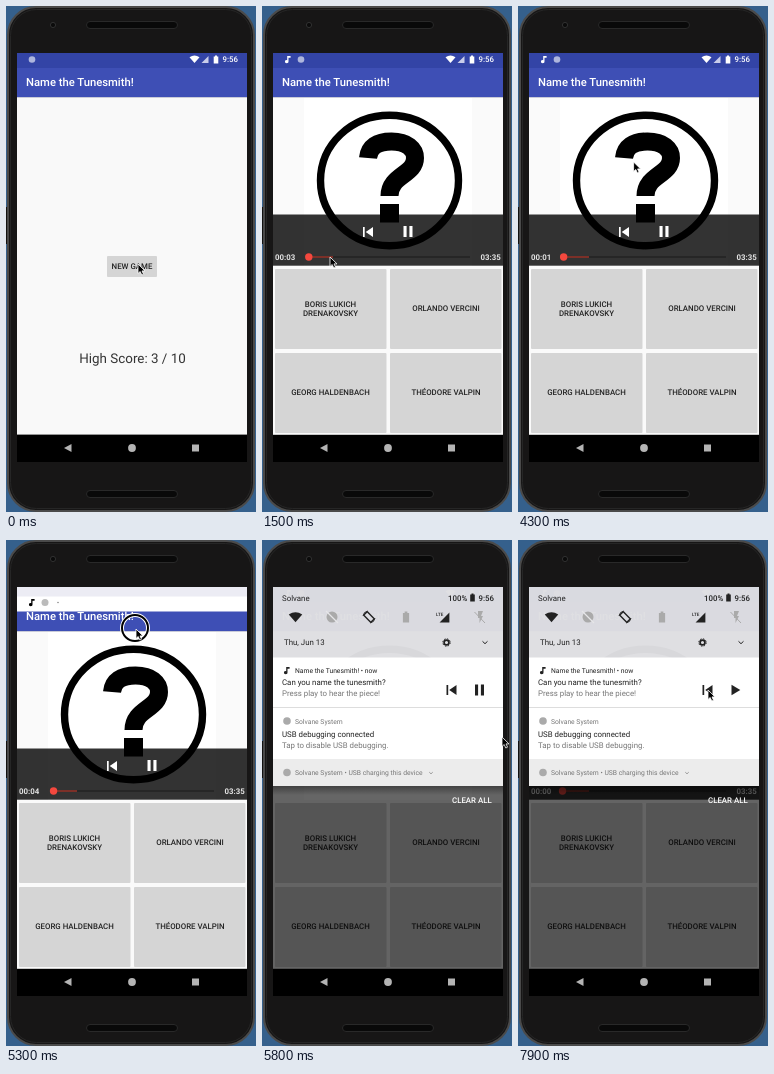
Write an HTML page that moves like this. It is 250x506 px and loops after 8 s.

```html
<!DOCTYPE html>
<html lang="en">
<head>
<meta charset="utf-8">
<title>Music quiz</title>
<style>
  html, body { margin: 0; width: 100%; height: 100%; overflow: hidden; background: #35608c; }
  svg { display: block; width: 250px; height: 506px; }
  text { font: 7.87px Roboto, sans-serif; white-space: pre; text-rendering: geometricPrecision; }
  .m { font-weight: 500; }
  .mid { text-anchor: middle; }
  .title { font-size: 11.25px; font-weight: 500; fill: #fff; }
  .small { font-size: 6.75px; }
  .grey { fill: #777; }
  .time { font-weight: 700; fill: #e4e4e4; }
  .line { fill: none; stroke: currentColor; }
</style>
</head>
<body>
<svg viewBox="0 0 250 506">
  <defs>
    <path id="note" d="M-.8 -3.5H2.6V-1.8H.5V2A1.8 1.6 0 1 1 -.8 .7Z"/>
    <path id="prev" d="M-5 -5H-3.3V5H-5ZM5 -5V5L-2.3 0Z"/>
    <path id="pause" d="M-4.5 -5.5H-1.4V5.5H-4.5ZM1.4 -5.5H4.5V5.5H1.4Z"/>
    <path id="play" d="M-4 -5.3L4.8 0L-4 5.3Z"/>
    <path id="wifi" d="M0 3.6L-5 -2.2Q0 -5.6 5 -2.2Z"/>
    <path id="signal" d="M-3.5 3.5H3.5V-3.5Z"/>
    <path id="battery" d="M-2.3 -3H-1V-4H1V-3H2.3V4H-2.3Z"/>
    <path id="chevron" class="line" d="M-2.5 -1.2L0 1.2L2.5 -1.2"/>
    <g id="appBar">
      <rect x="11" y="62" width="231" height="29" fill="#3e4fb5"/>
      <rect x="11" y="91" width="231" height="1" fill="#c9cbd8"/>
      <text class="title" x="20" y="80">Name the Tunesmith!</text>
    </g>
    <clipPath id="screen"><rect x="11" y="47" width="230" height="409"/></clipPath>
    <clipPath id="shadeClip"><rect id="shadeBox" x="11" y="47" width="231" height="0"/></clipPath>
    <linearGradient id="drop" x2="0" y2="1">
      <stop stop-opacity=".35"/><stop offset="1" stop-opacity="0"/>
    </linearGradient>
  </defs>

  <!-- handset -->
  <rect width="250" height="506" fill="#35608c"/>
  <rect x="2" y="1" width="246" height="504" rx="28" fill="#171616" stroke="#4a4a4a" stroke-width="2"/>
  <rect x="4.500" y="3.500" width="241" height="499" rx="26" fill="#171616" stroke="#262626"/>
  <path d="M.5 201V238" stroke="#111"/>
  <circle cx="47" cy="19" r="2.6" fill="#0b0b0b" stroke="#303030"/>
  <g fill="#090909" stroke="#292929">
    <rect x="80.500" y="15.500" width="91" height="7" rx="3.500"/>
    <rect x="80.500" y="484.500" width="91" height="7" rx="3.500"/>
  </g>

  <g clip-path="url(#screen)">
    <rect x="11" y="47" width="231" height="409" fill="#f9f9f9"/>
    <rect x="11" y="428.600" width="231" height="28"/>
    <g fill="#b4b4b4">
      <path d="M58 442L65.500 438V446Z"/>
      <circle cx="126" cy="442" r="3.900"/>
      <rect x="186" y="438.500" width="7" height="7"/>
    </g>

    <g id="home">
      <use href="#appBar"/>
      <rect id="newGame" x="101" y="250" width="50" height="21" rx="1" fill="#d5d5d5"/>
      <text class="m mid" x="126" y="263.300" fill="#222">NEW GAME</text>
      <text class="mid" x="126.500" y="356.500" fill="#333" style="font-size:13.4px">High Score: 3 / 10</text>
    </g>

    <rect id="surface" x="42" y="92" width="168" height="168"/>
    <g id="game">
      <path d="M11 62H242V428.600H11Z" fill="#fafafa"/>
      <rect x="42" y="92" width="168" height="168" fill="#fff"/>
      <use href="#appBar"/>
      <ellipse cx="127.500" cy="174.500" rx="69" ry="65.300" fill="none" stroke="#000" stroke-width="7.400"/>
      <path d="M106 152C107 141 115 135.500 129.500 135.500C145 135.500 153 143 153 152C153 169 127.500 169 127.500 190" fill="none" stroke="#000" stroke-width="18"/>
      <rect x="118" y="198" width="19" height="18.500"/>
      <g id="player">
        <rect x="11" y="208.500" width="231" height="51.200" fill-opacity=".8"/>
        <g fill="#fff">
          <use href="#prev" x="106" y="226"/>
          <use href="#pause" x="146" y="225.500"/>
        </g>
        <text class="time" id="clock" x="13" y="254"></text>
        <text class="time" x="218.500" y="254">03:35</text>
        <rect x="44" y="250" width="164" height="2" fill="#262626"/>
        <rect id="buffer" x="44" y="250" height="2" fill="#7c3028"/>
        <rect id="played" x="44" y="250" height="2" fill="#f4483e"/>
        <circle id="thumb" cy="251" r="3.700" fill="#f4483e"/>
      </g>
      <g fill="#d5d5d5">
        <rect x="13" y="263" width="111.500" height="80" rx="1"/>
        <rect x="128" y="263" width="111.500" height="80" rx="1"/>
        <rect x="13" y="347" width="111.500" height="80" rx="1"/>
        <rect x="128" y="347" width="111.500" height="80" rx="1"/>
      </g>
      <g fill="#222">
        <text class="m mid" x="68.500" y="300.500">BORIS LUKICH</text>
        <text class="m mid" x="68.500" y="309.500">DRENAKOVSKY</text>
        <text class="m mid" x="184" y="305">ORLANDO VERCINI</text>
        <text class="m mid" x="68.500" y="389">GEORG HALDENBACH</text>
        <text class="m mid" x="184" y="389">THÉODORE VALPIN</text>
      </g>
    </g>

    <rect x="11" y="47" width="231" height="15" fill="#3344a6"/>
    <g fill="#fff">
      <use id="tune" href="#note" x="26" y="53.500"/>
      <circle id="badge" cy="53.500" r="3.300" fill="#aeb6dd"/>
      <use href="#wifi" x="188.500" y="53.500"/>
      <use href="#signal" x="199" y="53.500" fill="#c9cdea"/>
      <use href="#battery" x="210" y="53.500"/>
      <text class="m" x="216.500" y="56.300">9:56</text>
    </g>

    <rect id="scrim" x="11" y="47" width="231" height="382"/>

    <g id="peek">
      <rect x="11" y="47" width="231" height="10" fill="#ececf4"/>
      <rect x="11" y="56.500" width="231" height="15" fill="#fff"/>
      <use href="#note" x="26" y="62.500"/>
      <circle cx="39" cy="62.500" r="3.500" fill="#bbb"/>
      <circle cx="52" cy="62.500" r=".8" fill="#888"/>
    </g>

    <g id="shade" clip-path="url(#shadeClip)" fill="#222" color="#222">
      <rect x="11" y="47" width="231" height="71" fill="#e9e9ec" opacity=".93"/>
      <text x="20" y="61">Solvane</text>
      <text class="m" x="186" y="61">100%</text>
      <use href="#battery" x="210.500" y="57.500"/>
      <text class="m" x="216.500" y="61">9:56</text>
      <use href="#wifi" transform="translate(33.500 77.500) scale(1.350)"/>
      <g fill="#aaa" color="#aaa">
        <circle cx="70" cy="77" r="5.500"/>
        <path d="M64 71L76 83" stroke="#e6e6e8" stroke-width="1.200"/>
        <use href="#battery" transform="translate(144 77) scale(1.350)"/>
        <path d="M216 71H221L219 76H221L217.500 83V78H216Z"/>
        <path class="line" d="M212.500 72L223 83"/>
      </g>
      <rect x="-2.500" y="-5" width="5" height="10" rx=".5" class="line" stroke-width="1.400" transform="translate(107 77) rotate(-45)"/>
      <path class="line" d="M101 76A6 6 0 0 1 106 71M113 78A6 6 0 0 1 108 83"/>
      <use href="#signal" transform="translate(182.500 77.500) scale(1.400)"/>
      <text class="m" x="174" y="76" style="font-size:4.5px">LTE</text>
      <text x="22" y="105">Thu, Jun 13</text>
      <circle class="line" cx="184.500" cy="102.500" r="2.400" stroke-width="1.700"/>
      <circle class="line" cx="184.500" cy="102.500" r="3.700" stroke-width="1" stroke-dasharray="1.500 1.406"/>
      <use href="#chevron" x="223" y="102.500"/>

      <rect x="11" y="117.500" width="231" height="102" fill="#fff"/>
      <rect x="11" y="167" width="231" height="1" fill="#ddd"/>
      <rect x="11" y="219" width="231" height="27" fill="#ececec"/>
      <use href="#note" x="25" y="130.500"/>
      <text class="small" x="33" y="133">Name the Tunesmith! • now</text>
      <text x="20" y="145">Can you name the tunesmith?</text>
      <text class="grey" x="20" y="156">Press play to hear the piece!</text>
      <use href="#prev" x="189.500" y="150"/>
      <use id="toggle" x="217.500" y="150"/>
      <circle cx="25" cy="181" r="3.800" fill="#aaa"/>
      <text class="small grey" x="33" y="183.500">Solvane System</text>
      <text x="20" y="197">USB debugging connected</text>
      <text class="grey" x="20" y="208">Tap to disable USB debugging.</text>
      <circle cx="25" cy="232.500" r="3.800" fill="#aaa"/>
      <text class="small grey" x="33" y="235">Solvane System • USB charging this device</text>
      <use href="#chevron" transform="translate(169 233) scale(.7)" color="#777"/>
    </g>
    <g id="below">
      <rect x="11" y="246" width="231" height="9" fill="url(#drop)"/>
      <text class="m" x="190" y="263" fill="#fff">CLEAR ALL</text>
    </g>
  </g>

  <g id="cursor">
    <g id="ring" fill="none">
      <circle cx="-1" cy="-1" r="13" stroke="#fff" stroke-width="4"/>
      <circle cx="-1" cy="-1" r="13" stroke="#000" stroke-width="2"/>
    </g>
    <path d="M0 0V9.500L2.200 7.500L3.800 11L5.500 10.200L4 6.900H7Z" stroke="#fff" stroke-width=".8"/>
  </g>
</svg>

<script>
const $ = id => document.getElementById(id);
const set = (id, attrs) => { for (const k in attrs) $(id).setAttribute(k, attrs[k]); };
const show = (id, on) => set(id, { display: on ? 'inline' : 'none' });
const clamp = x => Math.min(1, Math.max(0, x));

// Linear interpolation over rows of [time, ...values]
function track(rows, t) {
  const i = rows.findIndex(r => r[0] > t);
  if (i < 0) return rows.at(-1).slice(1);
  if (!i) return rows[0].slice(1);
  const a = rows[i - 1], b = rows[i], k = (t - a[0]) / (b[0] - a[0]);
  return a.slice(1).map((v, j) => v + (b[j + 1] - v) * k);
}

const LOOP = 8000, LENGTH = 215, SPEED = 2.5 / 1000;
const START = 300, GRAB = 1800, DROP = 3100, RESTART = 3700, PAUSE = 6700, REWIND = 7800;

const pointer = [
  [0, 132, 258], [300, 131, 257], [700, 131, 256], [1500, 68, 251], [1800, 48, 250],
  [2900, 92, 251], [3200, 92, 251], [3600, 106, 226], [3900, 106, 226], [4900, 130, 51],
  [5200, 130, 53], [5300, 130, 89], [5500, 133, 150], [5800, 240, 197], [6000, 240, 197],
  [6500, 217, 150], [6900, 217, 150], [7500, 190, 150]
];
const enter = [[100, 0, 30], [200, .3, 24], [300, .84, 11], [400, 1, 3], [500, 1, 0]];
const pull = [[5200, 0], [5300, 24], [5400, 95], [5500, 165], [5600, 199]];

function position(t, x) {
  if (t >= REWIND) return 0;
  if (t >= RESTART) return (Math.min(t, PAUSE) - RESTART) * SPEED;
  if (t >= DROP) return 61 + (t - DROP) * SPEED;
  if (t >= GRAB) return (x - 45.5) / 164 * LENGTH;
  return Math.max(0, t - START) * SPEED;
}

function draw(t) {
  const [x, y] = track(pointer, t);
  const [alpha, shift] = track(enter, t);
  const [height] = track(pull, t);

  set('cursor', { transform: `translate(${x} ${y})` });
  show('ring', t >= 5200 && t < 5500);
  set('newGame', { fill: t >= 100 ? '#c4c4c4' : '#d5d5d5' });
  set('game', { opacity: alpha, transform: `translate(0 ${shift})` });
  set('surface', { transform: `translate(0 ${shift})` });
  show('surface', t >= START);
  show('tune', t >= START);
  set('badge', { cx: t >= START ? 39 : 26 });

  const sec = position(t, x), px = 164 * sec / LENGTH, whole = Math.floor(sec);
  const pad = n => String(n).padStart(2, '0');
  $('clock').textContent = pad(Math.floor(whole / 60)) + ':' + pad(whole % 60);
  set('played', { width: px });
  set('thumb', { cx: 44.5 + px });
  set('buffer', { width: Math.max(27, px + 12) });
  show('player', t < 5700 || t >= PAUSE);

  const open = clamp((height - 24) / 175);
  set('scrim', { opacity: .6 * open });
  show('peek', height > 0 && height < 40);
  show('shade', height >= 40);
  set('shadeBox', { height });
  show('below', open === 1);
  set('toggle', { href: t >= PAUSE ? '#play' : '#pause' });
}

function tick() {
  draw(Math.floor(performance.now() % LOOP / 100) * 100);
  requestAnimationFrame(tick);
}
tick();
</script>
</body>
</html>
```
